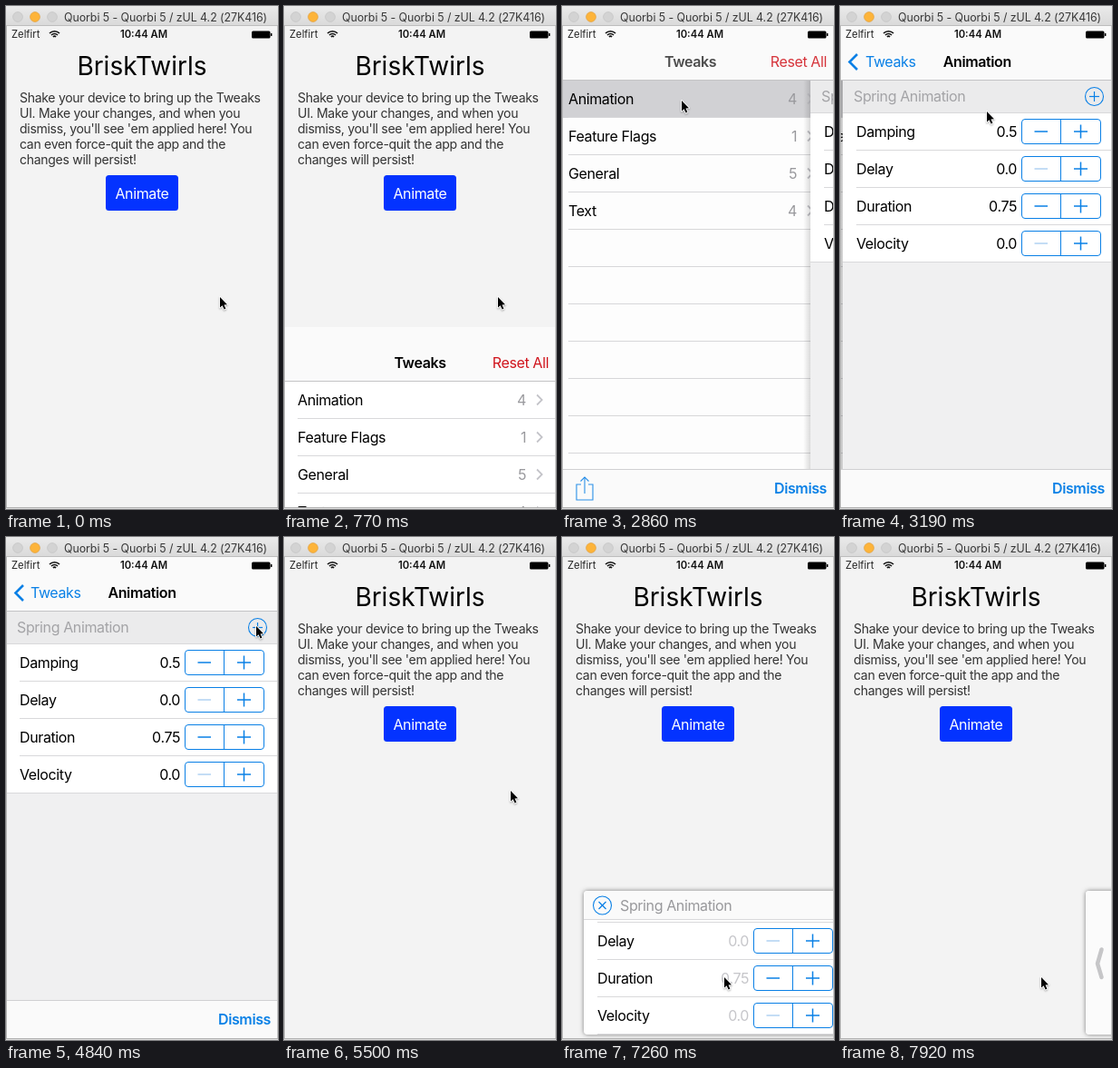
Animation of 300x553 px, one loop 8 s. Source, as an HTML page with a canvas:

```html
<!DOCTYPE html>
<html lang="en">
<head>
<meta charset="utf-8">
<title>Tweaks demo</title>
<style>
html, body { margin: 0; width: 100%; height: 100%; overflow: hidden; background: #f3f3f3; }
canvas { display: block; width: 300px; height: 553px; }
</style>
</head>
<body>
<canvas id="stage"></canvas>
<script>
const W = 300, H = 553, LOOP = 8000, STEP = 110;
const BLUE = '#0a80e6', GRAY = '#9a9a9e', LINE = '#d9d9db';
const canvas = document.getElementById('stage');
const c = canvas.getContext('2d');
const dpr = window.devicePixelRatio || 1;
canvas.width = W * dpr;
canvas.height = H * dpr;

// Start times of the main moves
const PRESENT = 700, PRESS = 2640, PUSH = 2834, DISMISS = 5060, FLOAT = 5560, STOW = 7400;

const CURSOR = [
  [0, 236, 320], [900, 236, 320], [1400, 212, 280], [1750, 212, 280], [2560, 132, 104],
  [2870, 132, 104], [3190, 162, 116], [3800, 230, 140], [4600, 276, 98], [5100, 276, 98],
  [5900, 223, 460], [6050, 223, 460], [6400, 223, 430], [6650, 223, 430], [7050, 160, 482],
  [7180, 160, 484], [7400, 222, 484], [8000, 222, 484]
];
const SCROLL = [[6050, 0], [6400, 30], [6600, 37]];

const clamp = v => Math.max(0, Math.min(1, v));
const mix = (a, b, p) => a + (b - a) * p;

// Critically damped approach from 0 to 1
function settle(t, start, k = 18.7) {
  const x = Math.max(0, (t - start) / 1000) * k;
  return 1 - Math.exp(-x) * (1 + x);
}

function keyed(keys, t, i = 1) {
  if (t <= keys[0][0]) return keys[0][i];
  for (let n = 1; n < keys.length; n++) {
    const a = keys[n - 1], b = keys[n];
    if (t < b[0]) {
      const p = (t - a[0]) / (b[0] - a[0]);
      return mix(a[i], b[i], p * p * (3 - 2 * p));
    }
  }
  return keys[keys.length - 1][i];
}

function rect(x, y, w, h, color) {
  c.fillStyle = color;
  c.fillRect(x, y, w, h);
}

function round(x, y, w, h, r) {
  c.beginPath();
  c.roundRect(x, y, w, h, r);
}

function text(s, x, y, size, color, align = 'left', weight = 400, track = -0.024) {
  c.font = `${weight} ${size}px Inter, "Open Sans", sans-serif`;
  c.letterSpacing = size * track + 'px';
  c.textAlign = align;
  c.fillStyle = color;
  c.fillText(s, x, y);
}

function path(points, color, width) {
  c.beginPath();
  points.forEach(([x, y], i) => i ? c.lineTo(x, y) : c.moveTo(x, y));
  c.strokeStyle = color;
  c.lineWidth = width;
  c.stroke();
}

function disc(x, y, r) {
  c.beginPath();
  c.arc(x, y, r, 0, 7);
}

// Draws in a frame moved by whole pixels
function at(x, y, draw) {
  c.save();
  c.translate(Math.round(x), Math.round(y));
  draw();
  c.restore();
}

function faded(alpha, draw) {
  if (alpha <= 0) return;
  c.save();
  c.globalAlpha = alpha;
  draw();
  c.restore();
}

function drawWindowBar() {
  const g = c.createLinearGradient(0, 0, 0, 22);
  g.addColorStop(0, '#eaeaea');
  g.addColorStop(1, '#d9d9d9');
  rect(0, 0, W, 22, g);
  rect(0, 21, W, 1, '#bdbdbd');
  ['#d3d3d3', '#fdb43a', '#d3d3d3'].forEach((color, i) => {
    disc(13 + 19 * i, 12, 5.4);
    c.fillStyle = color;
    c.fill();
    c.strokeStyle = i === 1 ? '#e0a040' : '#c3c3c3';
    c.lineWidth = 0.7;
    c.stroke();
  });
  text('Quorbi 5 - Quorbi 5 / zUL 4.2 (27K416)', 176, 16.5, 12.4, '#383838', 'center', 400, -0.005);
}

function drawStatus() {
  text('Zelfirt', 6, 35.3, 11.25, '#222', 'left', 400, 0);
  text('10:44 AM', 152, 35.3, 11.25, '#111', 'center', 600, 0);
  [2.2, 5, 7.8].forEach(r => {
    c.beginPath();
    c.arc(53.5, 35.5, r, -Math.PI * 0.75, -Math.PI * 0.25);
    c.strokeStyle = '#111';
    c.lineWidth = 1.6;
    c.stroke();
  });
  round(271, 27.5, 20.5, 8, 1.5);
  c.fillStyle = '#000';
  c.fill();
  rect(292, 30, 1.4, 3, '#000');
}

function drawHome() {
  rect(0, 22, W, H - 22, '#f3f3f3');
  text('BriskTwirls', 150, 76, 28, '#000', 'center', 400, 0);
  [
    'Shake your device to bring up the Tweaks',
    "UI. Make your changes, and when you",
    "dismiss, you'll see 'em applied here! You",
    'can even force-quit the app and the',
    'changes will persist!'
  ].forEach((s, i) => text(s, 15, 106.3 + 16.8 * i, 14.06, '#333', 'left', 400, -0.022));
  round(110, 186, 80, 39, 3.5);
  c.fillStyle = '#0433ff';
  c.fill();
  text('Animate', 150, 211.5, 16, '#fff', 'center');
}

function drawList(pressed) {
  rect(0, 82, W, H - 82, '#fff');
  if (pressed) rect(0, 82, W, 41, '#d3d3d6');
  const rows = [['Animation', 4], ['Feature Flags', 1], ['General', 5], ['Text', 4]];
  rows.forEach(([name, n], i) => {
    const y = 102 + 41 * i;
    text(name, 15, y + 6, 16, '#000');
    text(n, 267, y + 6, 16, GRAY, 'right');
    path([[279, y - 5.5], [284.5, y], [279, y + 5.5]], '#c4c4c9', 1.8);
  });
  for (let i = 0; i < 10; i++) rect(15, 122 + 41 * i, 285, 1, LINE);
}

function drawStepper(x, y, low) {
  round(x + 0.5, y - 13.5, 87, 27, 3.5);
  c.fillStyle = '#fff';
  c.fill();
  c.strokeStyle = BLUE;
  c.lineWidth = 1;
  c.stroke();
  path([[x + 43.5, y - 13.5], [x + 43.5, y + 13.5]], BLUE, 1);
  path([[x + 14.5, y], [x + 29, y]], low ? '#b0d2f2' : BLUE, 1.5);
  drawPlus(x + 65.5, y, 7.5, 1.5);
}

function drawPlus(x, y, r, width) {
  path([[x - r, y], [x + r, y]], BLUE, width);
  path([[x, y - r], [x, y + r]], BLUE, width);
}

const SPRING = [['Damping', '0.5'], ['Delay', '0.0'], ['Duration', '0.75'], ['Velocity', '0.0']];

function drawSpringRows(left, right, valueColor) {
  SPRING.forEach(([name, value], i) => {
    const y = 20 + 41 * i;
    text(name, left, y + 6, 16, '#000');
    text(value, right, y + 6, 16, valueColor, 'right');
    drawStepper(right + 5, y, value === '0.0');
    rect(left, y + 20, W, 1, LINE);
  });
}

function drawGroupPage() {
  rect(0, 82, W, H - 82, '#f0f0f1');
  rect(0, 82, W, 36, '#ebebec');
  rect(0, 117, W, 1, LINE);
  text('Spring Animation', 12, 105.3, 16, '#a3a3a6');
  disc(277.5, 99.5, 10);
  c.strokeStyle = BLUE;
  c.lineWidth = 1.1;
  c.stroke();
  drawPlus(277.5, 99.5, 5.5, 1.2);
  rect(0, 118, W, 163, '#fff');
  at(0, 118, () => drawSpringRows(15, 192, '#000'));
  rect(0, 281, W, 1, LINE);
}

function drawShare() {
  path([[21, 526], [16, 526], [16, 543], [34, 543], [34, 526], [29, 526]], BLUE, 1.1);
  path([[25, 536], [25, 518]], BLUE, 1.1);
  path([[20.5, 522.5], [25, 518], [29.5, 522.5]], BLUE, 1.1);
}

function drawEditor(t) {
  const p = settle(t, PUSH);
  const old = clamp(1 - p * 1.6), fresh = clamp(p * 1.5 - 0.3);
  at(-90 * p, 0, () => drawList(t >= PRESS));
  if (p > 0) {
    const x = W * (1 - p);
    rect(0, 82, x, H - 82, `rgba(0,0,0,${0.1 * p})`);
    if (x > 0.5) {
      const g = c.createLinearGradient(x - 8, 0, x, 0);
      g.addColorStop(0, 'rgba(0,0,0,0)');
      g.addColorStop(1, 'rgba(0,0,0,.14)');
      rect(x - 8, 82, 8, H - 82, g);
    }
    at(x, 0, drawGroupPage);
  }

  rect(0, 22, W, 60, '#fafafa');
  rect(0, 81, W, 1, '#c4c4c6');
  rect(0, 509, W, 44, '#fafafa');
  rect(0, 509, W, 1, '#d0d0d2');

  faded(clamp(1 - p * 3.5), () => text('Tweaks', 150 - 97 * p, 67, 16, '#000', 'center', 600));
  faded(old, () => {
    text('Reset All', 292, 67, 16, '#d0141c', 'right');
    drawShare();
  });
  faded(fresh, () => {
    text('Tweaks', 27 + 97 * (1 - p), 67, 16, BLUE);
    path([[19, 53], [10.5, 61.5], [19, 70]], BLUE, 2.6);
    text('Animation', 150 + 130 * (1 - p), 67, 16, '#000', 'center', 600);
  });
  text('Dismiss', 292, 536.3, 16, BLUE, 'right', 600);
}

function drawPanel(t) {
  const out = settle(t, STOW);
  const drag = keyed(CURSOR, Math.min(Math.max(t, 7180), STOW)) - 160;
  const y = 389 + 175 * (1 - settle(t, FLOAT));
  at(5 + drag + 204 * out, y, () => {
    c.save();
    c.shadowColor = 'rgba(0,0,0,.5)';
    c.shadowBlur = 5 * dpr;
    round(0, 0, 290, 158, 4);
    c.fillStyle = '#fff';
    c.fill();
    c.restore();
    c.clip();
    rect(0, 0, 290, 31, '#fafafa');
    disc(20.5, 16, 10);
    c.strokeStyle = BLUE;
    c.lineWidth = 1.1;
    c.stroke();
    path([[16.5, 12], [24.5, 20]], BLUE, 1.2);
    path([[24.5, 12], [16.5, 20]], BLUE, 1.2);
    text('Spring Animation', 40, 21.8, 16, '#98989b');
    c.save();
    c.beginPath();
    c.rect(0, 31, 290, 127);
    c.clip();
    at(0, 31 - keyed(SCROLL, t), () => drawSpringRows(15, 182, '#c6c6ca'));
    c.restore();
    rect(0, 31, 290, 1, LINE);
    faded(out, () => {
      rect(0, 0, 290, 158, '#fbfbfb');
      c.lineCap = c.lineJoin = 'round';
      path([[17.5, 64.5], [13, 80], [17.5, 95]], '#c6c6c8', 4.5);
    });
  });
}

function drawCursor(t) {
  const shape = [[0, 0], [0, 11.5], [2.6, 9.2], [4.6, 13.6], [6.4, 12.8], [4.5, 8.5], [8, 8.2]];
  at(keyed(CURSOR, t, 1), keyed(CURSOR, t, 2), () => {
    c.lineJoin = 'round';
    c.beginPath();
    shape.forEach(([x, y]) => c.lineTo(x, y));
    c.closePath();
    c.shadowColor = 'rgba(0,0,0,.3)';
    c.shadowBlur = 2 * dpr;
    c.shadowOffsetY = dpr;
    c.strokeStyle = '#fff';
    c.lineWidth = 1.8;
    c.stroke();
    c.shadowColor = 'transparent';
    c.fillStyle = '#000';
    c.fill();
  });
}

function draw(t) {
  c.setTransform(dpr, 0, 0, dpr, 0, 0);
  drawHome();
  if (t >= FLOAT) drawPanel(t);
  const lift = settle(t, PRESENT) - settle(t, DISMISS);
  if (lift > 0.001) at(0, 531 * (1 - lift), () => drawEditor(t));
  drawStatus();
  drawWindowBar();
  rect(0, 22, 1, H - 22, '#b4b4b4');
  rect(299, 22, 1, H - 22, '#c4c4c4');
  rect(0, 551, W, 1, '#b0b0b0');
  rect(0, 552, W, 1, '#dedede');
  drawCursor(t);
}

const began = performance.now();
function tick() {
  const t = (performance.now() - began) % LOOP;
  draw(Math.floor(t / STEP) * STEP);
  requestAnimationFrame(tick);
}
tick();
</script>
</body>
</html>
```
